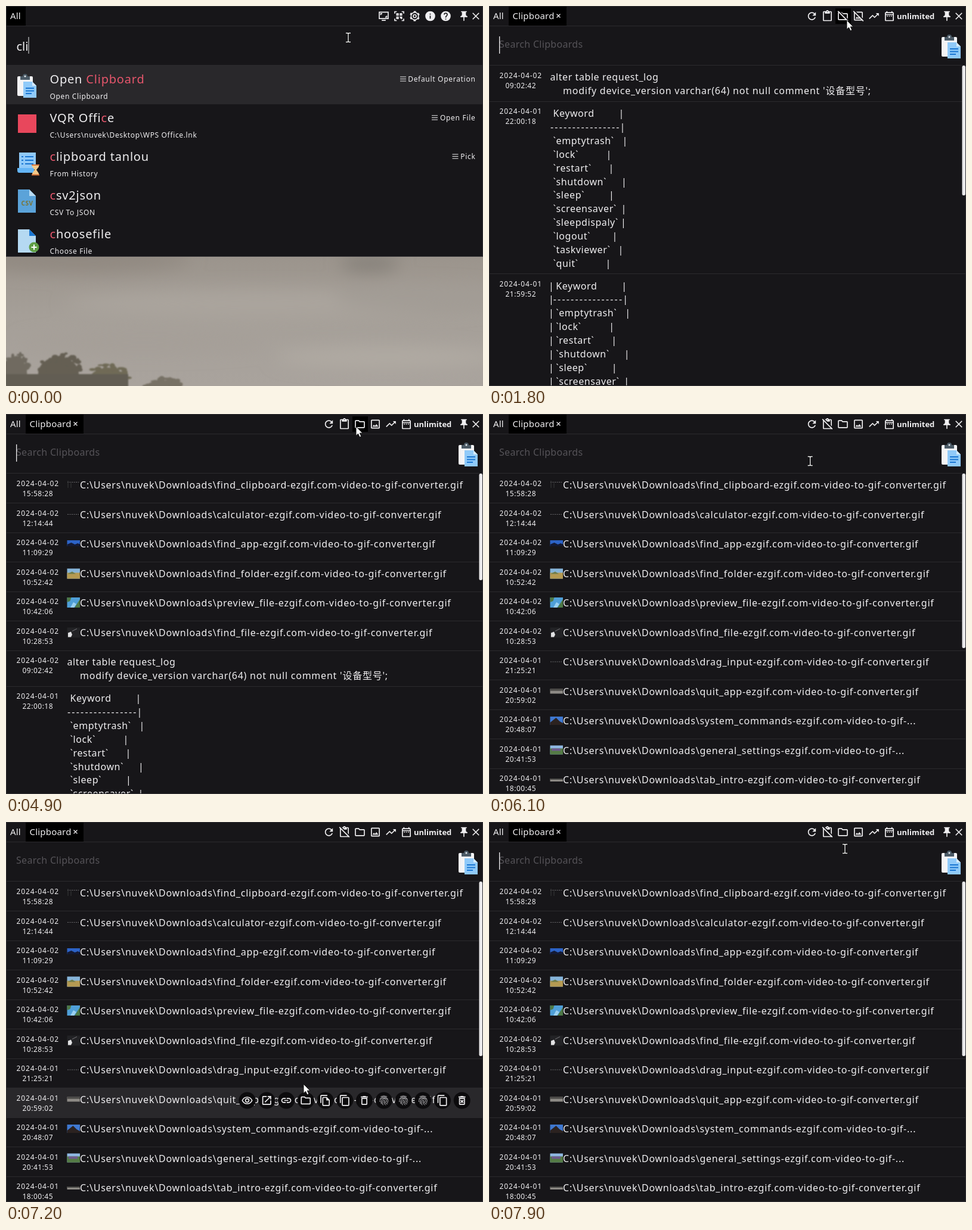
These frames come from a looping animation (800x638 px, 8000 ms). An HTML page:

```html
<!DOCTYPE html>
<html lang="en">
<head>
<meta charset="utf-8">
<title>Clipboard filters</title>
<style>
html, body { margin: 0; height: 100%; overflow: hidden; background: #171619; }
svg { display: block; width: 100%; height: 100%; }
text { font-family: "Noto Sans", "Open Sans", "Noto Sans CJK SC", "Noto Sans CJK", sans-serif; fill: #f0eff1; }
.body { font-size: 16px; letter-spacing: .77px; }
.key { font-size: 16px; letter-spacing: .57px; }
.title { font-size: 20px; letter-spacing: .8px; }
.sub { font-size: 12px; letter-spacing: .65px; }
.end { font-size: 12px; letter-spacing: .7px; text-anchor: end; }
.date { font-size: 12px; letter-spacing: .88px; text-anchor: middle; }
.time { font-size: 12px; letter-spacing: .5px; text-anchor: middle; }
.dash { font-size: 16px; letter-spacing: 2.2px; }
.bar { font-size: 16px; text-anchor: middle; }
.tab { font-size: 15px; letter-spacing: .2px; }
.bold { font-size: 13px; font-weight: 700; }
.hint { font-size: 16px; letter-spacing: .3px; fill: #555358; }
.input { font-size: 20px; }
.csv { font-size: 10px; font-weight: 700; fill: #7a7436; letter-spacing: .5px; text-anchor: middle; }
tspan { fill: #e6566c; }
</style>
</head>
<body>
<svg id="stage" viewBox="0 0 800 638" preserveAspectRatio="none"></svg>
<script>
const BG = '#171619', LINE = '#2b2a2d', HOVER = '#29282b', INK = '#f0eff1';
const LOOP = 8000, STEP = 100, PITCH = 49.5;

const rect = (x, y, w, h, fill, more = '') =>
  `<rect x="${x}" y="${y}" width="${w}" height="${h}" fill="${fill}" ${more}/>`;
const disc = (x, y, r, fill) => `<circle cx="${x}" cy="${y}" r="${r}" fill="${fill}"/>`;
const oval = (x, y, rx, ry, fill) => `<ellipse cx="${x}" cy="${y}" rx="${rx}" ry="${ry}" fill="${fill}"/>`;
const path = (d, fill = INK, more = '') => `<path d="${d}" fill="${fill}" ${more}/>`;
const stroke = (d, color = INK, w = 2) => path(d, 'none', `stroke="${color}" stroke-width="${w}"`);
const text = (x, y, s, cls) => `<text x="${x}" y="${y}" class="${cls}">${s}</text>`;
const group = (id, s, more = '') => `<g id="${id}" ${more}>${s}</g>`;

// Icons on a 24 unit grid
const COPY = 'M16 1H4c-1.1 0-2 .9-2 2v14h2V3h12V1z';
const BIN = 'M15.5 4l-1-1h-5l-1 1H5v2h14V4zM6 19c0 1.1.9 2 2 2h8c1.1 0 2-.9 2-2V7H6v12zM8 9h8v10H8V9z';
const ROUND = 'M12 2a10 10 0 1 0 0 20 10 10 0 0 0 0-20z';
const solid = d => path(d, INK, 'fill-rule="evenodd"');
const icons = {
  refresh: solid('M17.65 6.35C16.2 4.9 14.21 4 12 4c-4.42 0-7.99 3.58-7.99 8s3.57 8 7.99 8c3.73 0 6.84-2.55 7.73-6h-2.08c-.82 2.33-3.04 4-5.65 4-3.31 0-6-2.69-6-6s2.69-6 6-6c1.66 0 3.14.69 4.22 1.78L13 11h7V4z'),
  paste: solid('M19 2h-4.18C14.4.84 13.3 0 12 0S9.6.84 9.18 2H5c-1.1 0-2 .9-2 2v16c0 1.1.9 2 2 2h14c1.1 0 2-.9 2-2V4c0-1.1-.9-2-2-2zm-7 0a1 1 0 1 1 0 2 1 1 0 0 1 0-2zm7 18H5V4h2v3h10V4h2z'),
  folder: solid('M9.17 6l2 2H20v10H4V6zM10 4H4c-1.1 0-2 .9-2 2v12c0 1.1.9 2 2 2h16c1.1 0 2-.9 2-2V8c0-1.1-.9-2-2-2h-8z'),
  image: solid('M19 5v14H5V5zm0-2H5c-1.1 0-2 .9-2 2v14c0 1.1.9 2 2 2h14c1.1 0 2-.9 2-2V5c0-1.1-.9-2-2-2zm-4.86 8.86l-3 3.87L9 13.14 6 17h12z'),
  trend: solid('M16 6l2.29 2.29-4.88 4.88-4-4L2 16.59 3.41 18l6-6 4 4 6.3-6.29L22 12V6z'),
  calendar: solid('M7 11h2v2H7zm14-5v14c0 1.1-.9 2-2 2H5c-1.1 0-2-.9-2-2V6c0-1.1.9-2 2-2h1V2h2v2h8V2h2v2h1c1.1 0 2 .9 2 2zM5 8h14V6H5zm14 12V10H5v10zm-4-7h2v-2h-2zm-4 0h2v-2h-2z'),
  pin: solid('M16 9V4h1a1 1 0 0 0 0-2H7a1 1 0 0 0 0 2h1v5c0 1.66-1.34 3-3 3v2h5.97v7l1 1 1-1v-7H19v-2c-1.66 0-3-1.34-3-3z'),
  close: stroke('M5.7 5.7l12.6 12.6M18.3 5.7L5.7 18.3'),
  screen: stroke('M3 4h18v13H3zM8 20.5h8M6 10V7h3M18 11v3h-3'),
  scan: stroke('M7 3H3v4M17 3h4v4M7 21H3v-4M17 21h4v-4M7 7h3v3H7zM14 7h3v3h-3zM7 14h3v3H7zM13 14h2v3M17 13v5'),
  gear: stroke('M12 4.5a7.5 7.5 0 1 0 0 15 7.5 7.5 0 0 0 0-15zM12 9a3 3 0 1 0 0 6 3 3 0 0 0 0-6z') +
    '<circle cx="12" cy="12" r="9" fill="none" stroke="#f0eff1" stroke-width="2.4" stroke-dasharray="4.4 5.025" stroke-dashoffset="2.2" transform="rotate(30 12 12)"/>',
  info: solid(ROUND + 'M13 17h-2v-6h2zM13 9h-2V7h2z'),
  help: solid(ROUND + 'M13 19h-2v-2h2zm2.07-7.75l-.9.92C13.45 12.9 13 13.5 13 15h-2v-.5c0-1.1.45-2.1 1.17-2.83l1.24-1.26c.37-.36.59-.86.59-1.41a2 2 0 0 0-4 0H8a4 4 0 0 1 8 0c0 .88-.36 1.68-.93 2.25z'),
  eye: stroke('M2.2 12C6 3.2 18 3.2 21.8 12C18 20.8 6 20.8 2.2 12z') + stroke('M12 8.5a3.5 3.5 0 1 0 0 7 3.5 3.5 0 0 0 0-7z'),
  open: solid('M19 19H5V5h7V3H5c-1.1 0-2 .9-2 2v14c0 1.1.9 2 2 2h14c1.1 0 2-.9 2-2v-7h-2zM14 3v2h3.59l-9.83 9.83 1.41 1.41L19 6.41V10h2V3z'),
  link: stroke('M11 8H7a4 4 0 0 0 0 8h4M13 8h4a4 4 0 0 1 0 8h-4M8 12h8'),
  file: solid(COPY + 'M15 5H8c-1.1 0-2 .9-2 2v14c0 1.1.9 2 2 2h11c1.1 0 2-.9 2-2V11zM8 21V7h6v5h5v9z'),
  copy: solid(COPY + 'M19 5H8c-1.1 0-2 .9-2 2v14c0 1.1.9 2 2 2h11c1.1 0 2-.9 2-2V7c0-1.1-.9-2-2-2zm0 16H8V7h11z'),
  bin: solid(BIN),
  purge: solid(BIN) + stroke('M9.3 11.3l5.4 5.4M14.7 11.3l-5.4 5.4'),
  print: stroke('M5.5 4.5Q12 1 18.500 4.500M3.500 9.500Q12 0 20.500 9.500M4 15C2.500 4.500 21.500 4.500 20.500 14.500M7 19C3.500 7.500 18 5.500 17.500 13.500q.5 3 3 3M10.500 21.500C5 11 14.500 9.500 14.500 14q.5 5 5 5M12 13.500q0 6 4 8'.replace(/00/g, ''), '#cfced1', 1.1),
};
const slash = stroke('M4.5 1.5l20 20', BG, 2.4) + stroke('M2 2l20 20');
const place = (s, x, y, size = 20) =>
  `<g transform="translate(${x - size / 2} ${y - size / 2}) scale(${size / 24})">${s}</g>`;
const icon = (name, x, y = 17, size) => place(icons[name], x, y, size);
const toggle = (name, x) =>
  group(name + 'On', icon(name, x)) + group(name + 'Off', place(icons[name] + slash, x, 17));

const clipboard = (x, y) => `<g transform="translate(${x} ${y})">` +
  rect(0, 3, 26, 33, '#f4f4f5', 'rx="2"') + path('M5 3h4a4 4 0 0 1 8 0h4v6H5z', '#4b5a66') + disc(13, 3, 1.5, '#e8edf0') +
  path('M10 12h15l7 7v20H10z', '#90caf9') + path('M25 12l7 7h-7z', '#d7ecfd') +
  stroke('M14 23h14M14 27.5h14M14 32h10', '#1976d2', 1.8) + '</g>';

// Launcher scene
const result = (i, title, sub, action, menuX) => {
  const y = 100 + 65 * i;
  return text(73.5, y + 30, title, 'title') + text(73.5, y + 56, sub, 'sub') + (action ?
    stroke(`M${menuX} ${y + 19}h10m-10 3.5h10m-10 3.5h10`, INK, 1.2) + text(787.5, y + 27, action, 'end') : '');
};
const sheet = (y, fill, fold) => path(`M20 ${y}h19l11 11v28H20z`, fill) + path(`M39 ${y}l11 11H39z`, fold);
let seed = 7;
const random = () => (seed = seed * 16807 % 2147483647) / 2147483647;
// Foliage: small tufts scattered inside a dome
const tree = (x, y, rx, ry, fill) => oval(x, y + ry * .4, rx * .85, ry, fill) + Array.from({ length: 45 }, () => {
  const a = Math.PI * (1 + random()), r = .5 + .5 * random();
  return oval(x + rx * r * Math.cos(a), y + ry * (.3 + 1.2 * r * Math.sin(a)), 2 + 4 * random(), 1.5 + 3 * random(), fill);
}).join('');
const wallpaper = rect(0, 421, 800, 217, 'url(#sky)') + '<g filter="url(#soft)">' +
  oval(120, 425, 190, 22, '#918981') + oval(610, 432, 50, 14, '#858079') + oval(430, 500, 330, 24, '#aaa49d') +
  oval(700, 490, 150, 20, '#a29c95') + oval(230, 565, 210, 16, '#a59f98') + oval(640, 590, 190, 18, '#b0aaa3') + '</g><g filter="url(#edge)">' +
  tree(14, 606, 25, 28, '#706b60') + tree(88, 606, 40, 28, '#655f53') + tree(170, 622, 38, 24, '#6f6a57') +
  tree(265, 636, 34, 13, '#777165') + rect(0, 618, 205, 24, '#625d52') + '</g>';
const launcher = wallpaper + `<rect id="panel" width="800" fill="${BG}"/>` +
  rect(1, 1, 32, 32, '#000') + text(7, 22, 'All', 'tab') +
  ['screen', 'scan', 'gear', 'info', 'help'].map((n, i) => icon(n, 633.5 + 26 * i)).join('') +
  text(17.5, 75, 'cli', 'input') + rect(37.5, 52, 1, 28, INK) +
  rect(0, 99, 800, 66, HOVER) + clipboard(19, 115) +
  rect(20, 182, 31, 31, '#e8475c') +
  path('M22 246h28v28H22z', '#90caf9') + path('M19 272h28v8H22q-3 0-3-4z', '#64b5f6') + stroke('M26 253h3m3 0h14M26 259h3m3 0h14M26 265h3m3 0h14', '#1976d2') +
  path('M44 267h11v3l-4 5 4 6v3H44v-3l4-6-4-5z', '#f2c98a') + stroke('M43 267h13M43 283.5h13', '#d9743a') +
  sheet(308, '#5ba3d9', '#b8dcf3') + text(35.5, 335, 'CSV', 'csv') +
  sheet(375, '#b5d9f2', '#1976d2') + disc(47, 405, 8.5, '#5f9e45') + stroke('M42.5 405h9M47 400.5v9', '#fff') +
  result(0, 'Open <tspan>Clipboard</tspan>', 'Open Clipboard', 'Default Operation', 661) +
  result(1, 'VQR Offi<tspan>c</tspan>e', 'C:\\Users\\nuvek\\Desktop\\WPS Office.lnk', 'Open File', 714) +
  result(2, '<tspan>c</tspan>lipboard tanlou', 'From History', 'Pick', 748.5) +
  result(3, '<tspan>c</tspan>sv2json', 'CSV To JSON') +
  result(4, '<tspan>c</tspan>hoosefile', 'Choose File');

// Clipboard scene
const stamp = (y, day, time) => text(53.3, y + 21, '2024-04-0' + day, 'date') + text(53.3, y + 38, time, 'time');
const divider = y => rect(0, Math.round(y), 800, 1, LINE);
const files = [
  [2, '15:58:28', 'find_clipboard'], [2, '12:14:44', 'calculator'], [2, '11:09:29', 'find_app'],
  [2, '10:52:42', 'find_folder'], [2, '10:42:06', 'preview_file'], [2, '10:28:53', 'find_file'],
  [1, '21:25:21', 'drag_input'], [1, '20:59:02', 'quit_app'], [1, '20:48:07', 'system_commands'],
  [1, '20:41:53', 'general_settings'], [1, '18:00:45', 'tab_intro'],
];
const dots = y => `<path d="M103 ${y}h19" stroke="#6b6a6d" stroke-dasharray="2 1.5"/>`;
const photo = (y, h, fill) => rect(102.5, y, 21.5, h, fill);
const strip = (y, h) => photo(y, h, '#8d8a85') + photo(y, h * .4, '#4a4947');
const thumbs = [
  y => dots(y + 14.5) + stroke(`M104 ${y + 12}v12m5-8v8`, '#3b3a3d', 1),
  y => dots(y + 19),
  y => photo(y + 13, 10, '#2c63c7') + path(`M102.5 ${y + 23}v-3l7-3 6 3 5-2 3.5 2v3z`, '#141a33'),
  y => photo(y + 11, 17, '#86b4d9') + photo(y + 18, 10, '#b59a52') + path(`M103 ${y + 20}l8-4 6 4z`, '#6e7d4c'),
  y => photo(y + 10, 17, '#4f9fd8') + path(`M102.5 ${y + 10}h7l-2 6-5 2zM124 ${y + 13}v14h-9z`, '#4d7846') + path(`M108 ${y + 27}l5-9 5 3-4 6z`, '#9bd0f0'),
  y => photo(y + 11, 17, '#222225') + path(`M104 ${y + 27}v-7l5-2 2 5-2 4z`, '#e2e2e4') + stroke(`M111 ${y + 17}l8-4`, '#77767a', 1),
  y => dots(y + 19),
  y => strip(y + 15, 8),
  y => photo(y + 12, 14, '#3f78d0') + path(`M102.5 ${y + 26}v-4l10-8 6 6 5.5 3v3z`, '#2b2220'),
  y => photo(y + 11, 15, '#8fb7e2') + photo(y + 16, 10, '#547b45') + rect(105, y + 16, 15, 4, '#6f5a8e'),
  y => strip(y + 17, 5),
];
const fileRow = ([day, time, name], i) => {
  const y = 100 + PITCH * i, tail = i == 8 || i == 9 ? '...' : 'converter.gif';
  return stamp(y, day, time) + thumbs[i](y) + divider(y + 49) +
    text(124, y + 25, `C:\\Users\\nuvek\\Downloads\\${name}-ezgif.com-video-to-gif-${tail}`, 'body');
};

const keys = 'emptytrash lock restart shutdown sleep screensaver sleepdispaly logout taskviewer quit'.split(' ');
const bars = [222, 224, 228, 201, 205, 226.5, 205.5, 226, 225.5, 211, 221, 200];
const table = (y, time, lead) => {
  const line = i => y + 26 + 22.9 * i, dx = lead ? 4.7 : 0;
  return stamp(y, 1, time) + divider(y + 289) + bars.map((x, i) =>
    text(x + dx, line(i), '|', 'bar') + (lead ? text(104.5, line(i), '|', 'bar') : '') +
    (i == 1 ? text(103 + dx, line(i), '-'.repeat(16), 'dash')
      : text(107.5 + dx, line(i), i ? '`' + keys[i - 2] + '`' : 'Keyword', 'key'))).join('');
};
const snippets = stamp(100, 2, '09:02:42') + text(102.5, 125, 'alter table request_log', 'key') +
  text(124, 148, "modify device_version varchar(64) not null comment '设备型号';", 'body') + divider(160) +
  table(160, '22:00:18', false) + table(449.5, '21:59:52', true);

const actions = 'eye open link folder file copy bin print print print copy purge'.split(' ');
const manager = rect(0, 0, 800, 638, BG) + rect(33, 1, 97, 32, '#000') +
  text(7, 22, 'All', 'tab') + text(39.5, 22, 'Clipboard', 'tab') + stroke('M113.5 13.5l6 6m0-6l-6 6', INK, 1.2) +
  `<rect id="iconHover" y="4" width="26" height="26" fill="#000"/>` +
  icon('refresh', 541.5) + toggle('paste', 567.5) + toggle('folder', 593.5) + toggle('image', 619.5) +
  icon('trend', 645.5) + icon('calendar', 671.5) + text(684, 22, 'unlimited', 'bold') +
  text(17, 70, 'Search Clipboards', 'hint') + group('caret', rect(17, 51, 1.3, 29, INK)) + clipboard(759, 49) +
  `<rect id="rowHover" width="800" height="50" fill="${HOVER}"/>` + group('snippets', snippets) +
  group('recent', files.slice(0, 6).map(fileRow).join('')) +
  group('older', files.slice(6).map((f, i) => fileRow(f, i + 6)).join('')) +
  group('actions', actions.map((n, i) => disc(404.5 + 32.75 * i, 21, 14, '#0c0b0d') + icon(n, 404.5 + 32.75 * i, 21)).join('')) +
  `<rect id="scroll" x="793.5" y="100" width="5.5" rx="2.5" fill="#e9e8ea"/>`;

const chrome = divider(33) + divider(99) + icon('pin', 768) + icon('close', 788);
const beam = 'M-4-7.5h3l1 1 1-1h3M0-6.5v13M-4 7.5h3l1-1 1 1h3';
const pointer = group('beam', stroke(beam, '#000', 3) + stroke(beam, '#fff', 1.3)) +
  group('arrow', path('M0 0v15.5l3.5-3.3 2.6 5.6 2.7-1.2-2.5-5.5h4.7z', '#fff', 'stroke="#111" stroke-width="1"'));

stage.innerHTML = `<defs>
  <linearGradient id="sky" x2="0" y2="1"><stop stop-color="#9b948c"/><stop offset=".45" stop-color="#a59f98"/><stop offset="1" stop-color="#a9a39d"/></linearGradient>
  <filter id="soft" x="-30%" y="-30%" width="160%" height="160%"><feGaussianBlur stdDeviation="14"/></filter>
  <filter id="edge"><feGaussianBlur stdDeviation="1"/></filter></defs>` +
  group('launcher', launcher) + group('manager', manager) + chrome +
  `<rect id="frame" x=".5" y=".5" width="799" fill="none" stroke="#323134"/>` + group('pointer', pointer);

// Timeline
const el = id => document.getElementById(id);
const show = (id, on) => el(id).setAttribute('display', on ? 'inline' : 'none');
const set = (id, name, v) => el(id).setAttribute(name, v);
const blinks = [400, 900, 1400, 1900, 2500, 3000, 3500, 3900, 4400, 5000, 5500, 6000, 6500, 7000, 7500];
const route = [
  [0, 574, 53], [1100, 574, 53], [1500, 600, 34], [2000, 600, 17], [2800, 600, 17], [2900, 609, 15], [3300, 619, 8],
  [3700, 616, 17], [4700, 616, 17], [4800, 602, 20], [4900, 587, 21], [5300, 566, 17], [5900, 566, 17],
  [6200, 525, 110], [6500, 470, 300], [6600, 460, 354], [6800, 465, 440], [7000, 482, 530],
  [7200, 499, 440], [7700, 588, 120], [7900, 597, 45], [8000, 597, 45],
];
const pos = t => {
  const i = Math.max(1, route.findIndex(p => p[0] >= t)), [t0, x0, y0] = route[i - 1], [t1, x1, y1] = route[i];
  const k = (t - t0) / (t1 - t0);
  return [x0 + (x1 - x0) * k, y0 + (y1 - y0) * k];
};

function draw(t) {
  const open = t >= 400, withFiles = t >= 2200, filesOnly = t >= 5600;
  const [x, y] = pos(t), [hx, hy] = pos(Math.max(0, t - STEP)); // hover trails the pointer by one step
  show('launcher', !open);
  show('manager', open);
  const height = open ? 638 : t < 100 ? 421 : 490;
  set('panel', 'height', height);
  set('frame', 'height', height - 1);

  show('pasteOn', !filesOnly);
  show('pasteOff', filesOnly);
  show('folderOn', withFiles);
  show('folderOff', !withFiles);
  show('imageOn', t >= 4500);
  show('imageOff', t < 4500);
  show('recent', withFiles);
  show('older', filesOnly);
  show('snippets', !filesOnly);
  set('snippets', 'transform', `translate(0 ${withFiles ? 6 * PITCH : 0})`);
  show('scroll', t >= 500);
  set('scroll', 'height', filesOnly ? 293 : withFiles ? 179 : 218);
  show('caret', blinks.filter(b => b <= t).length % 2);

  show('iconHover', hy < 31);
  set('iconHover', 'x', 555 + 26 * Math.floor((hx - 555) / 26));
  const row = Math.floor((hy - 100) / PITCH), top = 100 + PITCH * row;
  show('rowHover', row >= 0);
  show('actions', row >= 0);
  set('rowHover', 'y', Math.floor(top - .5));
  set('actions', 'transform', `translate(0 ${top})`);

  const typing = y > 34 && y < 100;
  show('beam', typing);
  show('arrow', !typing);
  set('pointer', 'transform', `translate(${x} ${y})`);
}

const start = performance.now();
function tick() {
  const t = (performance.now() - start) % LOOP;
  draw(Math.floor(t / STEP) * STEP);
  requestAnimationFrame(tick);
}
tick();
</script>
</body>
</html>
```
